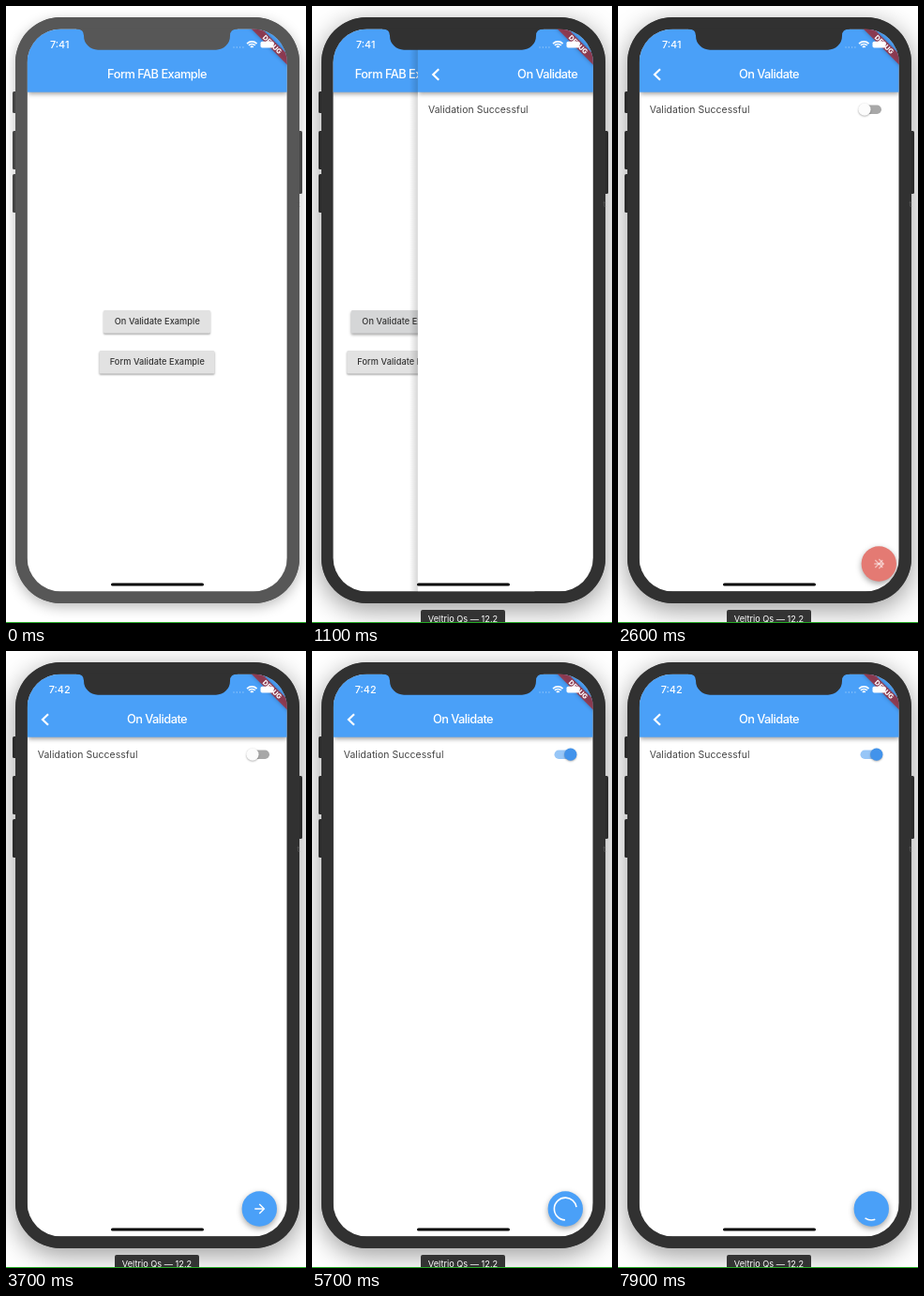
Recreate the animation shown at these times as an HTML page with a canvas. Size 320 by 657 pixels, loop 8 s.

```html
<!DOCTYPE html>
<html lang="en">
<head>
<meta charset="utf-8">
<title>Form button demo</title>
<style>
  html, body { margin: 0; width: 320px; height: 657px; overflow: hidden; background: #fff; }
  canvas { display: block; width: 320px; height: 657px; }
</style>
</head>
<body>
<canvas id="stage"></canvas>
<script>
const W = 320, H = 657, LOOP = 8000, STEP = 100;
const canvas = document.getElementById('stage');
const dpr = window.devicePixelRatio || 1;
canvas.width = W * dpr;
canvas.height = H * dpr;
const ctx = canvas.getContext('2d');
ctx.scale(dpr, dpr);

const BODY = [10, 12, 303, 624, 48];
const SCREEN = { x: 22.6, y: 24.5, w: 277.2, h: 599, r: 36 };
const BLUE = [74, 160, 248], RED = [228, 122, 115];
const TAU = Math.PI * 2;

const clamp = v => Math.max(0, Math.min(1, v));
const progress = (t, from, to) => clamp((t - from) / (to - from));
const mix = (a, b, k) => a + (b - a) * k;
const blend = (a, b, k) => `rgb(${a.map((v, i) => Math.round(mix(v, b[i], k)))})`;
const white = a => `rgba(255,255,255,${a})`;
const black = a => `rgba(0,0,0,${a})`;
const bezelColor = active => active ? '#313131' : '#575757';

function bezier(x1, y1, x2, y2) {
  const at = (a, b, s) => 3 * (1 - s) ** 2 * s * a + 3 * (1 - s) * s * s * b + s ** 3;
  return x => {
    let lo = 0, hi = 1;
    for (let i = 0; i < 24; i++) {
      const mid = (lo + hi) / 2;
      if (at(x1, x2, mid) < x) lo = mid; else hi = mid;
    }
    return x <= 0 ? 0 : x >= 1 ? 1 : at(y1, y2, lo);
  };
}
const slideEase = bezier(0.35, 0.91, 0.33, 0.97);
const fastOutSlowIn = bezier(0.4, 0, 0.2, 1);

function layer(draw) {
  ctx.save();
  draw();
  ctx.restore();
}

function shadow(color, blur, dy) {
  ctx.shadowColor = color;
  ctx.shadowBlur = blur * dpr;
  ctx.shadowOffsetY = dy * dpr;
}

function box(x, y, w, h, r, fill) {
  ctx.beginPath();
  ctx.roundRect(x, y, w, h, r);
  ctx.fillStyle = fill;
  ctx.fill();
}

function disc(x, y, r, fill) {
  ctx.beginPath();
  ctx.arc(x, y, r, 0, TAU);
  ctx.fillStyle = fill;
  ctx.fill();
}

function stroke(color, width) {
  ctx.strokeStyle = color;
  ctx.lineWidth = width;
  ctx.stroke();
}

function line(points, color, width) {
  ctx.beginPath();
  points.forEach(([x, y]) => ctx.lineTo(x, y));
  stroke(color, width);
}

function arc(x, y, r, from, to, color, width) {
  ctx.beginPath();
  ctx.arc(x, y, r, from, to);
  stroke(color, width);
}

function text(str, x, y, size, color, { weight = 400, align = 'left', spacing = 0 } = {}) {
  ctx.font = `${weight} ${size}px Inter, sans-serif`;
  ctx.letterSpacing = spacing + 'px';
  ctx.textAlign = align;
  ctx.fillStyle = color;
  ctx.fillText(str, x, y);
}

function drawBody(active) {
  const side = active ? '#2b2b2b' : '#444';
  layer(() => {
    shadow(black(active ? 0.4 : 0.27), active ? 28 : 14, active ? 7 : 4);
    box(...BODY, '#555');
  });
  for (const [y, h] of [[91, 23], [133, 41], [179, 41]]) box(7, y, 5, h, 1.5, side);
  box(311, 133, 5, 67, 1.5, side);
  box(...BODY, bezelColor(active));
  text('t', 310.5, 214, 9, '#555');
}

function drawNotch(active) {
  const top = SCREEN.y, bottom = 46.7;
  ctx.beginPath();
  ctx.moveTo(75, top - 1);
  ctx.lineTo(75, top);
  ctx.quadraticCurveTo(83, top, 83, top + 7);
  ctx.arcTo(83, bottom, 98, bottom, 15);
  ctx.lineTo(224, bottom);
  ctx.arcTo(239, bottom, 239, top + 7, 15);
  ctx.quadraticCurveTo(239, top, 247, top);
  ctx.lineTo(247, top - 1);
  ctx.fillStyle = bezelColor(active);
  ctx.fill();
}

function drawStatus(clock) {
  text(clock, 57.2, 45, 10.8, '#fff', { weight: 500, align: 'center' });
  for (let i = 0; i < 4; i++) disc(243 + i * 3.3, 44, 0.7, white(0.4));
  for (const r of [2, 4.8, 7.4]) {
    arc(262.3, 45.3, r, -Math.PI * 0.75, -Math.PI * 0.25, '#fff', 1.7);
  }
  box(271.5, 37.8, 14, 6.8, 1.8, '#fff');
}

function drawRibbon() {
  layer(() => {
    ctx.translate(284, 41);
    ctx.rotate(Math.PI / 4);
    layer(() => {
      shadow(black(0.45), 4, 0);
      ctx.fillStyle = 'rgba(183,28,28,0.66)';
      ctx.fillRect(-30, -4, 60, 8);
    });
    text('DEBUG', 0, 2.6, 7.2, '#fff', { weight: 800, align: 'center' });
  });
}

function drawPage(title) {
  const { x, y, w, h } = SCREEN;
  ctx.fillStyle = '#fff';
  ctx.fillRect(x, y, w, h);
  layer(() => {
    shadow(black(0.4), 5, 2);
    ctx.fillStyle = blend(BLUE, RED, 0);
    ctx.fillRect(x, y, w, 67.2);
  });
  text(title, 161, 77.3, 12.8, '#fff', { weight: 500, align: 'center', spacing: -0.52 });
}

function drawButton(label, y, width, pressed) {
  layer(() => {
    shadow(black(0.35), 2 + pressed, 1.2 + 0.5 * pressed);
    box(161 - width / 2, y, width, 24.5, 1.5, blend([226, 226, 226], [213, 214, 215], pressed));
  });
  text(label, 161.3, y + 15.2, 9.2, '#333', { weight: 500, align: 'center', spacing: 0.06 });
}

function drawHome(t) {
  drawPage('Form FAB Example');
  drawButton('On Validate Example', 324, 114, progress(t, 600, 900));
  drawButton('Form Validate Example', 367, 123, 0);
}

function drawSwitch(t) {
  const on = fastOutSlowIn(progress(t, 4280, 4520));
  const halo = progress(t, 4050, 4250) * (1 - progress(t, 4450, 4800));
  const x = mix(263, 275.8, on);
  box(258.5, 105.5, 22.5, 9.4, 4.7, blend([168, 168, 168], [151, 198, 247], on));
  if (halo) disc(x, 110.2, 13.4, `rgba(${mix(0, 74, on)},${mix(0, 150, on)},${mix(0, 240, on)},${0.13 * halo})`);
  layer(() => {
    shadow(black(0.35), 2, 0.7);
    disc(x, 110.2, 6.6, blend([252, 252, 252], [66, 147, 235], on));
  });
}

function drawArrow(alpha) {
  line([[-5, 0], [4.6, 0]], white(alpha), 1.4);
  line([[0, -5], [5, 0], [0, 5]], white(alpha), 1.4);
}

function drawCross(alpha) {
  line([[-4, -4], [4, 4]], white(alpha), 1.4);
  line([[-4, 4], [4, -4]], white(alpha), 1.4);
}

// Each one-second cycle grows the head, then pulls in the tail.
function drawSpinner(ms, alpha) {
  const step = Math.floor(ms / 1000), phase = ms / 1000 - step;
  const head = fastOutSlowIn(clamp(phase * 2));
  const tail = fastOutSlowIn(clamp(phase * 2 - 1));
  const start = Math.PI * (-0.5 + 1.5 * tail + 1.7 * phase - 0.8 * step);
  const sweep = Math.max((head - tail) * 1.5 * Math.PI, 0.001);
  arc(0, 0, 11.9, start, start + sweep, white(alpha), 1.6);
}

function drawFab(t) {
  const red = progress(t, 2450, 2600) * (1 - progress(t, 2900, 3200));
  const cross = progress(t, 2500, 2700) * (1 - progress(t, 2900, 3100));
  const shaking = t > 2500 && t < 3100;
  const shift = shaking ? 8 * Math.sin((t - 2500) / 400 * TAU) : 0;
  const load = progress(t, 5140, 5340);
  layer(() => {
    ctx.translate(270.3 + shift, 594);
    layer(() => {
      shadow(black(0.36), 6, 2.5);
      disc(0, 0, 18.7, blend(BLUE, RED, red));
    });
    for (const tap of [2200, 5050]) {
      const spread = progress(t, tap, tap + 250);
      const fade = 1 - progress(t, tap + 200, tap + 400);
      if (spread && fade) disc(0, 0, 18.7 * spread, white(0.2 * fade));
    }
    const arrow = (1 - cross) * (1 - load);
    if (arrow) drawArrow(arrow);
    if (cross) drawCross(cross);
    if (load) drawSpinner(t - 5140, load);
  });
}

function drawForm(t) {
  drawPage('On Validate');
  line([[45, 67.2], [39, 73], [45, 78.8]], '#fff', 2.2);
  text('Validation Successful', 33.7, 114, 10.4, '#444', { spacing: 0.08 });
  drawSwitch(t);
  drawFab(t);
}

function drawPageEdge(right) {
  const width = 9;
  const fade = ctx.createLinearGradient(right - width, 0, right, 0);
  fade.addColorStop(0, black(0));
  fade.addColorStop(1, black(0.16));
  ctx.fillStyle = fade;
  ctx.fillRect(right - width, SCREEN.y, width, SCREEN.h);
}

function drawScreens(t) {
  const { x, y, w, h } = SCREEN;
  const shown = slideEase(progress(t, 990, 1390));
  const left = w * (1 - shown);
  if (shown < 1) {
    layer(() => {
      ctx.translate(-w * shown / 3, 0);
      drawHome(t);
    });
  }
  if (shown > 0) {
    if (shown < 1) drawPageEdge(x + left);
    layer(() => {
      ctx.translate(left, 0);
      ctx.beginPath();
      ctx.rect(x, y, w, h);
      ctx.clip();
      drawForm(t);
    });
  }
}

function drawLabel() {
  box(116, 643, 90, 18, 2, '#333');
  text('Veltrio Qs — 12.2', 161, 656.3, 9.2, '#fff', { align: 'center' });
}

function render(t) {
  const active = t >= 100;
  ctx.fillStyle = '#fff';
  ctx.fillRect(0, 0, W, H);
  drawBody(active);
  layer(() => {
    ctx.beginPath();
    ctx.roundRect(SCREEN.x, SCREEN.y, SCREEN.w, SCREEN.h, SCREEN.r);
    ctx.clip();
    drawScreens(t);
    drawRibbon();
    drawStatus(t < 3600 ? '7:41' : '7:42');
    box(112, 614.4, 99, 3.2, 1.6, '#000');
  });
  drawNotch(active);
  if (active) drawLabel();
  ctx.fillStyle = '#22a822';
  ctx.fillRect(0, 656, W, 1);
}

function tick() {
  const t = (performance.now() + 3) % LOOP;
  render(Math.floor(t / STEP) * STEP);
  requestAnimationFrame(tick);
}
tick();
</script>
</body>
</html>
```
